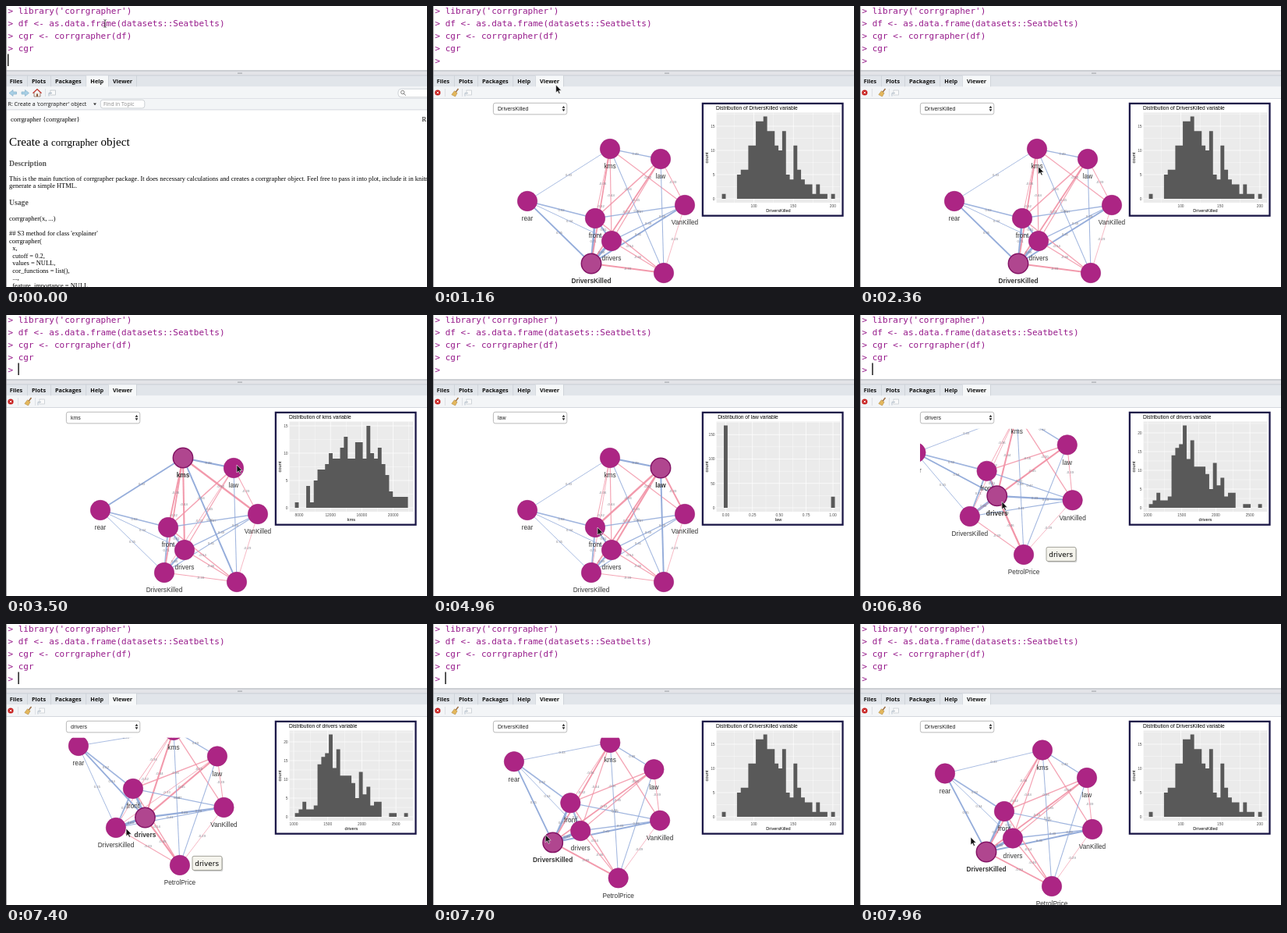
Animation, 540 px wide and 360 px high, one loop 8000 ms. Source, as an HTML page:

```html
<!DOCTYPE html>
<html lang="en">
<head>
<meta charset="utf-8">
<title>Correlation graph in the viewer pane</title>
<style>
html, body { margin: 0; width: 100%; height: 100%; overflow: hidden; background: #fff; }
svg { display: block; width: 540px; height: 360px; }
.sans { font-family: "Liberation Sans", Arial, sans-serif; }
.serif { font-family: "Liberation Serif", Times, serif; }
.mono { font: 11px "DejaVu Sans Mono", monospace; fill: #96198a; white-space: pre; }
.ui { font-family: "Open Sans", "Noto Sans", sans-serif; }
.mid { text-anchor: middle; }
.end { text-anchor: end; }
.tick { font-size: 4.9px; fill: #4d4d4d; }
.node { font-size: 8.3px; fill: #343434; }
.corr { font-size: 4.2px; fill: #7d7d88; }
</style>
</head>
<body>
<svg id="stage" viewBox="0 0 540 360"></svg>
<script>
const LOOP = 8000;
const stage = document.getElementById('stage');

function el(parent, tag, attrs = {}, text) {
  const e = document.createElementNS('http://www.w3.org/2000/svg', tag);
  set(e, attrs);
  if (text !== undefined) e.textContent = text;
  parent.appendChild(e);
  return e;
}
function set(e, attrs) {
  for (const k in attrs) e.setAttribute(k, attrs[k]);
}
const group = (parent, attrs) => el(parent, 'g', attrs);
const rect = (parent, x, y, width, height, fill, more) =>
  el(parent, 'rect', { x, y, width, height, fill, ...more });
const label = (parent, x, y, cls, size, text, more) =>
  el(parent, 'text', { x, y, class: cls, 'font-size': size, ...more }, text);
const path = (parent, d, fill, more) => el(parent, 'path', { d, fill, ...more });
const show = (e, on) => e.setAttribute('visibility', on ? 'visible' : 'hidden');

// Bursts of screen updates: start, end, number of steps
const bursts = [
  [200, 630, 6], [960, 1360, 10], [1500, 1960, 14], [2160, 2700, 14],
  [2900, 3060, 3], [3200, 3500, 10], [3730, 3800, 3], [3960, 4760, 20],
  [4800, 4960, 5], [5100, 5100, 1], [5260, 5660, 12], [5900, 6030, 3],
  [6360, 7160, 24], [7200, 7960, 24]
];
function held(t) {
  let h = 0;
  for (const [a, b, n] of bursts) {
    if (t < a) break;
    const step = n > 1 ? (b - a) / (n - 1) : 1;
    h = a + Math.min(n - 1, Math.floor((t - a) / step + 1e-6)) * step;
  }
  return h;
}

// Smooth curve through [time, x, y] keys; rests at the ends and at repeated keys
function slope(keys, i, c) {
  if (i < 1 || i > keys.length - 2) return 0;
  const [p, k, n] = [keys[i - 1], keys[i], keys[i + 1]];
  return (k[c] - p[c]) * (n[c] - k[c]) === 0 ? 0 : (n[c] - p[c]) / (n[0] - p[0]);
}
function along(keys, t) {
  const last = keys.length - 1;
  if (t <= keys[0][0]) return keys[0].slice(1);
  if (t >= keys[last][0]) return keys[last].slice(1);
  let i = 0;
  while (keys[i + 1][0] <= t) i++;
  const span = keys[i + 1][0] - keys[i][0], u = (t - keys[i][0]) / span;
  return [1, 2].map(c =>
    keys[i][c] * (1 + 2 * u) * (1 - u) ** 2 + keys[i + 1][c] * u * u * (3 - 2 * u) +
    span * (slope(keys, i, c) * u * (1 - u) ** 2 - slope(keys, i + 1, c) * u * u * (1 - u)));
}

// Console
rect(stage, 0, 0, 540, 360, '#fff');
["> library('corrgrapher')", '> df <- as.data.frame(datasets::Seatbelts)',
 '> cgr <- corrgrapher(df)', '> cgr'].forEach((s, i) => label(stage, 2.4, 10 + 16 * i, 'mono', 11, s));
const prompt = label(stage, 2.4, 74, 'mono', 11, '>');
const caret = rect(stage, 2, 61.5, 1.4, 15.5, '#111');

// Pane frame and tabs
rect(stage, 0, 82.5, 540, 6.5, '#e3e4e8');
rect(stage, 0, 82.5, 540, .9, '#a9adb3');
rect(stage, 297, 85.6, 6, 1, '#9a9da3');
rect(stage, 0, 89, 540, 14.5, '#e1e5ea');
rect(stage, 0, 88.6, 540, .7, '#bcc3ca');
rect(stage, 0, 103.5, 540, 15, '#f3f5f7');
const activeTab = rect(stage, 131, 89.3, 36, 15, '#f6f8f9');
[27, 57, 102.5, 131, 167].forEach(x => rect(stage, x, 89.3, .6, 14, '#c3c9cf'));
[['Files', 4.7], ['Plots', 33], ['Packages', 63], ['Help', 108.3], ['Viewer', 137]].forEach(([s, x]) =>
  label(stage, x, 98.7, 'ui', 7.3, s, { 'font-weight': 700, fill: '#111' }));
rect(stage, 0, 118, 540, .7, '#c5cbd1');

// Help page
const help = group(stage);
const blue = { stroke: '#6d9cba', 'stroke-width': .5 };
path(help, 'M4 111.5l5-4v2.5h4.5v3H9v2.5z', '#a9d0e6', blue);
path(help, 'M29.5 111.5l-5-4v2.5H20v3h4.5v2.5z', '#a9d0e6', blue);
path(help, 'M36 111v5h8v-5', '#f4efe8', { stroke: '#7c5b4c', 'stroke-width': .7 });
path(help, 'M34.5 111.7L40 106.6l5.5 5.1', 'none', { stroke: '#c2372e', 'stroke-width': 1.4 });
rect(help, 39, 112.5, 2, 3.5, '#8c5a3c');
rect(help, 50, 106, .6, 10, '#cfd3d7');
rect(help, 57, 108, 6.5, 6, '#fafafa', { stroke: '#b4bac0', 'stroke-width': .7 });
path(help, 'M55 115.5v-4h4', 'none', { stroke: '#a5b4c2', 'stroke-width': 1 });
rect(help, 503, 106.2, 50, 10.6, '#fff', { rx: 4, stroke: '#bcc2c8', 'stroke-width': .7 });
el(help, 'circle', { cx: 508.7, cy: 110.5, r: 2.2, fill: 'none', stroke: '#777', 'stroke-width': .9 });
path(help, 'M510.3 112.2l2.4 2.5', 'none', { stroke: '#777', 'stroke-width': 1 });
rect(help, 0, 118.7, 540, 14.3, '#f3f5f7');
rect(help, 0, 132.6, 540, .7, '#c5cbd1');
label(help, 2.6, 128, 'ui', 7, "R: Create a 'corrgrapher' object", { fill: '#111' });
path(help, 'M112 124.6h4l-2 2.6z', '#333');
rect(help, 121.3, 120.3, 56.5, 10.6, '#fff', { rx: 3, stroke: '#b9bfc5', 'stroke-width': .7 });
label(help, 125, 128.3, 'ui', 6.8, 'Find in Topic', { fill: '#8a8a8a' });
const doc = (x, y, size, s, more) => label(help, x, y, 'serif', size, s, more);
const gray = { 'font-weight': 700, fill: '#555' };
doc(6, 148.3, 8.44, 'corrgrapher {corrgrapher}');
doc(533.5, 148.3, 8.44, 'R Documentation');
doc(4, 179, 15.2, 'Create a');
doc(58, 179, 12.9, 'corrgrapher');
doc(121.5, 179, 15.2, 'object');
doc(4, 204.5, 9.7, 'Description', gray);
doc(4, 224, 8.44, 'This is the main function of corrgrapher package. It does necessary calculations and creates a corrgrapher object. Feel free to pass it into plot, include it in knitr');
doc(4, 233.4, 8.44, 'generate a simple HTML.');
doc(4, 254.8, 9.7, 'Usage', gray);
['corrgrapher(x, ...)', '', "## S3 method for class 'explainer'", 'corrgrapher(', '  x,', '  cutoff = 0.2,',
 '  values = NULL,', '  cor_functions = list(),', '  ...,', '  feature_importance = NULL,']
  .forEach((s, i) => doc(s[0] === ' ' ? 8.3 : 4, 275 + 9.55 * i, 8.44, s.trim()));

// Viewer toolbar
const viewer = group(stage);
el(viewer, 'circle', { cx: 6, cy: 111, r: 3.6, fill: '#c8201f' });
path(viewer, 'M4.7 109.7l2.6 2.6M7.3 109.7l-2.6 2.6', 'none', { stroke: '#fff', 'stroke-width': 1 });
rect(viewer, 15, 106, .6, 10, '#cfd3d7');
path(viewer, 'M32.5 106l-3.5 4.5', 'none', { stroke: '#9a6b3e', 'stroke-width': 1.4 });
path(viewer, 'M27.5 108.8l3.6 2.8-2.6 4.4-4.6-2.4z', '#e3b75c', { stroke: '#a87c35', 'stroke-width': .5 });
rect(viewer, 37, 106, .6, 10, '#cfd3d7');
rect(viewer, 43, 108, 6.5, 6, '#fafafa', { stroke: '#c0c6cc', 'stroke-width': .7 });
path(viewer, 'M41 115.5v-4h4', 'none', { stroke: '#b5c1cc', 'stroke-width': 1 });

const content = group(stage);

// Variable chooser
rect(content, 77.4, 124.3, 94.4, 14.6, '#fff', { rx: 2.5, stroke: '#a9a9a9', 'stroke-width': .8 });
const choice = label(content, 83, 134.2, 'sans', 7, '', { fill: '#222' });
path(content, 'M165.6 130.8h3.8l-1.9-2.7zM165.6 132.2h3.8l-1.9 2.7z', '#222');

// Graph: rest position, then position at each of the later drag times
const dragTimes = [6360, 6860, 7400, 7960];
const places = {
  kms: [227, 183, 201, 126, 215, 136, 234, 161.5],
  law: [292, 196, 265.5, 166, 271, 169.5, 291, 197],
  rear: [121, 250, 71, 175, 93, 156, 109, 191.5],
  VanKilled: [323, 255, 272, 237, 279.5, 235, 298, 263],
  front: [208, 272, 162, 199, 163, 211, 185, 240],
  drivers: [229, 301, 175, 231, 178.5, 248, 196, 274.5],
  PetrolPrice: [296, 342, 209, 306.5, 223, 309, 246, 336],
  DriversKilled: [203, 330, 140, 257, 141, 261, 162, 292]
};
const links = {
  DriversKilled: { drivers: .89, front: .71, rear: .35, kms: -.32, PetrolPrice: -.39, VanKilled: .41, law: -.33 },
  drivers: { front: .81, rear: .34, kms: -.44, PetrolPrice: -.46, VanKilled: .49, law: -.45 },
  front: { rear: .62, kms: -.36, PetrolPrice: -.54, VanKilled: .47, law: -.56 },
  kms: { rear: .33, PetrolPrice: .38, VanKilled: -.5, law: .49 },
  PetrolPrice: { VanKilled: -.29, law: .39 },
  VanKilled: { law: -.39 }
};
const clip = el(el(stage, 'defs'), 'clipPath', { id: 'canvas' });
rect(clip, 77, 145.7, 268, 214.3, '#000');
const graph = group(content, { 'clip-path': 'url(#canvas)' });
const lines = group(graph), numbers = group(graph);

const edges = [];
for (const a in links) for (const b in links[a]) {
  const r = links[a][b];
  edges.push({
    a, b, r,
    line: el(lines, 'line', { stroke: r > 0 ? '#90a9d9' : '#f295a8' }),
    text: el(numbers, 'text', { class: 'sans corr mid' }, r.toFixed(2))
  });
}
const nodes = Object.entries(places).map(([name, p]) => {
  const g = group(graph);
  return {
    name, g,
    keys: dragTimes.map((t, i) => [t, p[2 * i], p[2 * i + 1]]),
    dot: el(g, 'circle', { r: 12.7 }),
    text: el(g, 'text', { class: 'sans node mid', y: 25.3 }, name)
  };
});

function drawGraph(t, chosen) {
  const pos = {};
  for (const n of nodes) {
    const on = n.name === chosen;
    const [x, y] = pos[n.name] = along(n.keys, t);
    set(n.g, { transform: `translate(${x} ${y})` });
    set(n.dot, { fill: on ? '#b0468f' : '#ac2584', stroke: on ? '#831465' : '#9c1f78', 'stroke-width': on ? 1.5 : .6 });
    set(n.text, { 'font-weight': on ? 700 : 400 });
  }
  for (const { a, b, r, line, text } of edges) {
    const [x1, y1] = pos[a], [x2, y2] = pos[b];
    const on = a === chosen || b === chosen;
    set(line, { x1, y1, x2, y2, 'stroke-width': 2.7 * Math.abs(r) + (on ? .9 : 0), opacity: on ? .95 : .85 });
    set(text, { x: (x1 + x2) / 2, y: (y1 + y2) / 2 + 1.5 });
  }
}

// Histograms. x: first tick, step, count, place, spacing; y: step, count, pixels per unit
const plots = {
  DriversKilled: { x: [100, 50, 3, 411.5, 50.7], y: [5, 4, 6.2],
    bars: [1, 0, 0, 0, 5, 6, 6, 11, 11, 16, 16, 17, 14, 14, 11, 10, 14, 5, 4, 11, 6, 4, 3, 3, 1, 3, 1, 1, 0, 1] },
  kms: { x: [8000, 4000, 4, 376, 40.2], y: [5, 4, 7],
    bars: [1, 0, 0, 4, 1, 5, 7, 7, 8, 10, 9, 9, 11, 13, 9, 9, 12, 12, 9, 15, 10, 9, 11, 8, 6, 3, 2, 2, 2, 2] },
  law: { x: [0, .25, 5, 375.4, 34.4], y: [50, 4, .625], digits: 2,
    bars: Array.from({ length: 30 }, (_, i) => i === 0 ? 169 : i === 29 ? 23 : 0) },
  front: { x: [500, 250, 4, 385, 40.1], y: [5, 4, 6.6],
    bars: [1, 1, 3, 4, 5, 4, 7, 6, 12, 9, 14, 12, 16, 13, 15, 11, 12, 9, 10, 8, 6, 5, 4, 3, 3, 2, 2, 1, 0, 1] },
  drivers: { x: [1000, 500, 4, 369, 43.7], y: [5, 5, 4.8],
    bars: [1, 2, 4, 2, 2, 3, 14, 16, 17, 22, 13, 18, 11, 11, 11, 9, 5, 12, 6, 8, 3, 4, 4, 0, 0, 1, 1, 0, 0, 1] }
};
const PANEL = { left: 363.6, right: 522.6, top: 136.5, bottom: 252 }, ZERO = 247;

rect(content, 345.9, 124.9, 179.6, 143.8, '#fff', { stroke: '#1c1848', 'stroke-width': 2.3 });
label(content, 0, 0, 'sans mid', 5.8, 'count', { transform: 'translate(353.2 194.5) rotate(-90)' });

function buildPlot(name) {
  const { x, y, bars, digits = 0 } = plots[name];
  const { left, right, top, bottom } = PANEL;
  const g = group(content);
  const grid = (vertical, at, w) => {
    if (vertical && at > left && at < right) rect(g, at - w / 2, top, w, bottom - top, '#fff');
    if (!vertical && at > top && at < bottom) rect(g, left, at - w / 2, right - left, w, '#fff');
  };
  label(g, name === 'law' ? 365.3 : 363, 132.6, 'sans', 6.65, `Distribution of ${name} variable`);
  rect(g, left, top, right - left, bottom - top, '#ebebeb');
  for (let i = 0; i < x[2]; i++) {
    const px = x[3] + i * x[4];
    grid(true, px, .7);
    grid(true, px + x[4] / 2, .35);
    if (!i) grid(true, px - x[4] / 2, .35);
    label(g, px, 258, 'sans tick mid', 4.9, (x[0] + i * x[1]).toFixed(digits));
  }
  for (let i = 0; i < y[1]; i++) {
    const py = ZERO - i * y[0] * y[2];
    grid(false, py, .7);
    grid(false, py - y[0] * y[2] / 2, .35);
    label(g, 361.6, py + 1.8, 'sans tick end', 4.9, i * y[0]);
  }
  const w = 4.83, x0 = name === 'law' ? 373 : 370.6, pitch = name === 'law' ? 4.745 : w;
  path(g, bars.map((n, i) => n ? `M${x0 + i * pitch} ${ZERO}v${-n * y[2]}h${w + .05}v${n * y[2]}z` : '').join(''), '#595959');
  label(g, 443, 264.4, 'sans mid', 5.6, name);
  return g;
}
const charts = Object.keys(plots).map(name => ({ name, g: buildPlot(name) }));

// Hover tip
const tip = group(content);
rect(tip, 240.3, 299, 38, 18, '#000', { rx: 2, opacity: .18 });
rect(tip, 239, 297.4, 38, 18, '#f5f4ed', { rx: 2, stroke: '#808074', 'stroke-width': .7 });
label(tip, 242.3, 309.7, '', 8.9, 'drivers', { 'font-family': '"DejaVu Sans", sans-serif' });

// Left edge of the window and the mouse
rect(stage, 0, 0, .8, 360, '#8b8b8f');
const mouse = group(stage);
const beam = path(mouse, 'M0 -3.5v8M-1.6 -4.3q1.6 0 1.6 1q0 -1 1.6 -1M-1.6 5.3q1.6 0 1.6 -1q0 1 1.6 1', 'none',
  { stroke: '#333', 'stroke-width': .9 });
const arrow = path(mouse, 'M0 0v10l2.3-2.1 1.6 3.5 1.6-.7-1.6-3.4h3.1z', '#111', { stroke: '#fff', 'stroke-width': .6 });

const mousePath = [
  [0, 127, 22], [960, 127, 22], [1160, 161, 110], [1360, 177, 158], [1500, 177, 158],
  [1960, 229, 211], [2160, 229, 211], [2700, 228, 187], [3200, 228, 187], [3500, 296, 192],
  [3730, 296, 192], [3800, 294, 194], [3960, 294, 194], [4760, 219, 266], [4960, 211, 272],
  [5260, 211, 272], [5460, 244, 298], [5660, 235, 308], [6360, 235, 308], [6860, 181, 238],
  [7160, 178, 247], [7400, 154, 262], [7600, 146, 268], [7960, 142, 273]
];
const clicks = [[0, 'DriversKilled'], [2900, 'kms'], [3960, 'law'], [5100, 'front'], [5900, 'drivers'], [7600, 'DriversKilled']];

function draw(time) {
  const t = held(time);
  const chosen = clicks.filter(c => c[0] <= t).pop()[1];
  const inViewer = t >= 280;

  show(prompt, t >= 200);
  show(caret, t < 200 || Math.floor((t + 106) / 500) % 2 === 1);
  set(caret, { x: t < 200 ? 2 : 15.4 });

  set(activeTab, inViewer ? { x: 131, width: 36 } : { x: 102.5, width: 28.5 });
  set(help, { display: inViewer ? 'none' : 'inline' });
  set(viewer, { display: inViewer ? 'inline' : 'none' });
  set(content, { display: t >= 440 ? 'inline' : 'none' });

  choice.textContent = chosen;
  drawGraph(t, chosen);
  for (const c of charts) set(c.g, { display: c.name === chosen ? 'inline' : 'none' });
  show(tip, t >= 6030 && t < 7600);

  const [x, y] = along(mousePath, t);
  set(mouse, { transform: `translate(${x} ${y})` });
  show(beam, y < 82);
  show(arrow, y >= 82);
}

const start = performance.now();
function tick(now) {
  draw(Math.max(0, now - start) % LOOP);
  requestAnimationFrame(tick);
}
draw(0);
requestAnimationFrame(tick);
</script>
</body>
</html>
```
